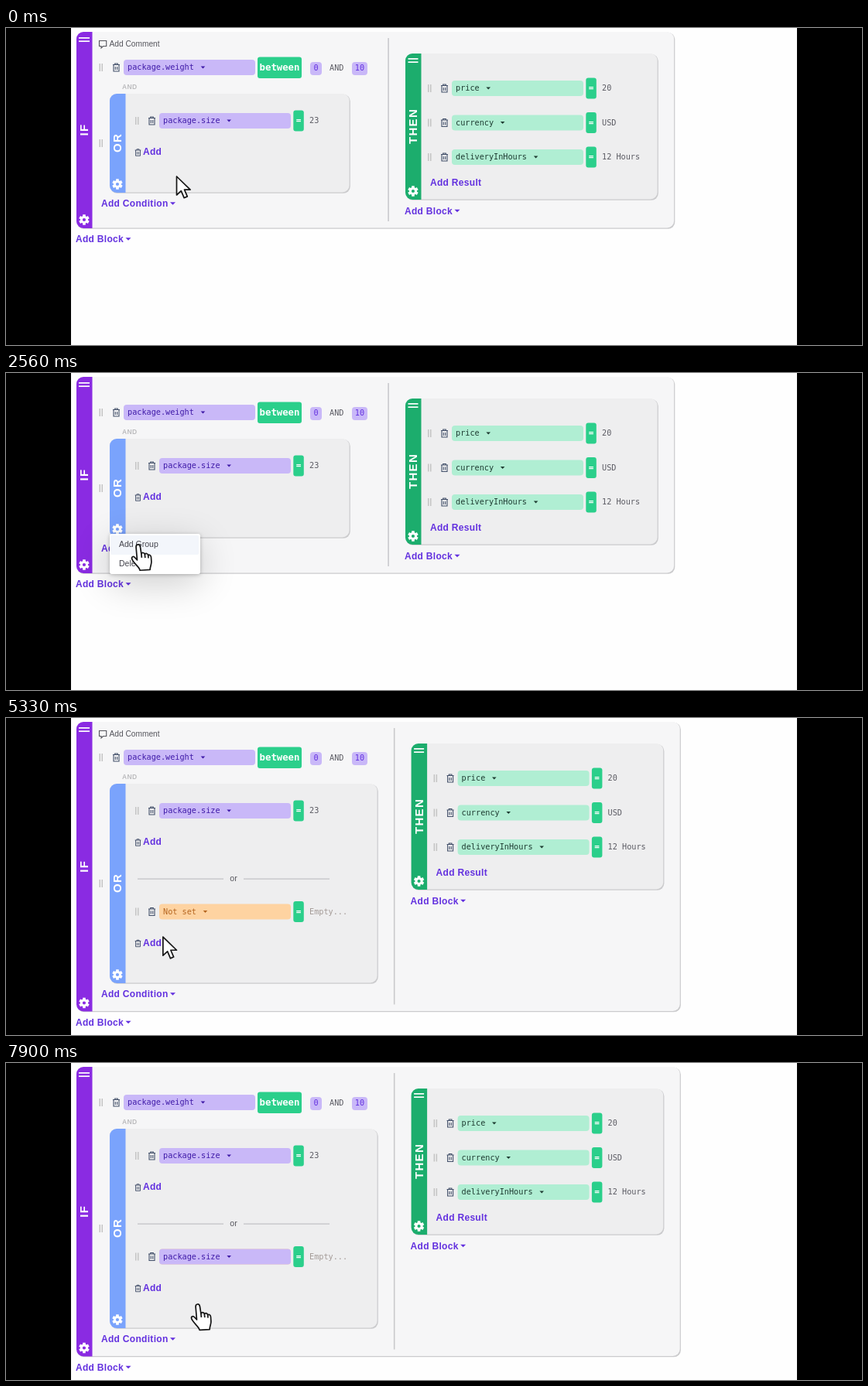
Animation, 1106 px wide and 410 px high, one loop 8000 ms. Source, as an HTML page with a canvas:

```html
<!DOCTYPE html>
<html lang="en">
<head>
<meta charset="utf-8">
<title>Rule builder</title>
<style>
  html, body { margin: 0; width: 100%; height: 100%; overflow: hidden; background: #000; }
  canvas { display: block; }
</style>
</head>
<body>
<canvas id="stage" width="1106" height="410"></canvas>
<script>
const LOOP = 8000;
const ctx = document.getElementById('stage').getContext('2d');
const SANS = '"Liberation Sans", Arial, sans-serif';
const MONO = '"DejaVu Sans Mono", monospace';
const C = {
  violet: '#8a2be2', blue: '#7aa3fc', green: '#1cad6d', op: '#2bcf8b',
  lilac: '#c9b8f8', lilacHover: '#aa87fd', mint: '#b0eed3', peach: '#fed3a1',
  link: '#6331df', linkHover: '#45229c', ink: '#3f1aa8', icon: '#43506a', grip: '#c4c4c4', value: '#5b5b63'
};

const ramp = (t, start, length) => Math.min(1, Math.max(0, (t - start) / length));
const ease = p => p * p * (3 - 2 * p);

function box(x, y, w, h, r, fill) {
  ctx.fillStyle = fill;
  ctx.beginPath();
  ctx.roundRect(x, y, w, h, r);
  ctx.fill();
}

function text(str, x, y, color, font, spacing = 0, align = 'left') {
  ctx.font = font;
  ctx.fillStyle = color;
  ctx.textAlign = align;
  ctx.letterSpacing = spacing + 'px';
  ctx.fillText(str, x, y);
}

const mono = (str, x, y, color, size = 10.2) => text(str, x, y, color, `${size}px ${MONO}`);

function faded(alpha, draw) {
  if (alpha <= 0) return;
  ctx.save();
  ctx.globalAlpha *= alpha;
  draw();
  ctx.restore();
}

function caret(x, y, color, r = 3) {
  ctx.fillStyle = color;
  ctx.beginPath();
  ctx.moveTo(x - r, y - r / 2);
  ctx.lineTo(x + r, y - r / 2);
  ctx.lineTo(x, y + r / 2);
  ctx.fill();
}

function link(str, x, y, caretX, color = C.link) {
  text(str, x, y, color, `bold 12px ${SANS}`, 0.3);
  if (caretX) caret(caretX, y - 1, color, 3.5);
}

function grip(x, y) {
  box(x - 2, y - 5, 1.5, 10, 0, C.grip);
  box(x + 1, y - 5, 1.5, 10, 0, C.grip);
}

function trash(x, y, s = 1) {
  ctx.save();
  ctx.translate(x, y);
  ctx.scale(s, s);
  ctx.strokeStyle = C.icon;
  ctx.lineWidth = 1.1;
  ctx.stroke(new Path2D('M-4.5 -3.5H4.5M-1.8 -3.5V-5H1.8V-3.5M-3.5 -3.5V5H3.5V-3.5M-1.2 -1V3M1.2 -1V3'));
  ctx.restore();
}

function gear(x, y) {
  ctx.save();
  ctx.translate(x, y);
  ctx.fillStyle = '#fff';
  ctx.beginPath();
  for (let i = 0; i < 6; i++) {
    ctx.rect(-1.8, -6.7, 3.6, 4);
    ctx.rotate(Math.PI / 3);
  }
  ctx.fill();
  ctx.lineWidth = 3;
  ctx.strokeStyle = '#fff';
  ctx.beginPath();
  ctx.arc(0, 0, 3.6, 0, 7);
  ctx.stroke();
  ctx.restore();
}

function panel(x, y, right, bottom, fill, bar, barWidth, label) {
  const w = right - x, h = bottom - y;
  box(x + 0.8, y + 0.8, w, h, 9, '#cbcbcd');
  box(x, y, w - 0.4, h - 0.6, 9, fill);
  box(x, y, barWidth, h, [9, 0, 0, 9], bar);
  const mid = x + barWidth / 2;
  ctx.save();
  ctx.translate(mid + 0.8, (y + bottom) / 2);
  ctx.rotate(-Math.PI / 2);
  text(label, 0.5, 0, '#fff', `bold 15px ${SANS}`, 1.3, 'center');
  ctx.restore();
  gear(mid - 0.3, bottom - 11);
}

function burger(x, y, w) {
  box(x, y, w, 1.7, 0, '#fff');
  box(x, y + 4.3, w, 1.7, 0, '#fff');
}

function pill(x, y, label, fill, ink) {
  box(x, y - 10, 170, 20, 4, fill);
  mono(label, x + 5, y + 0.5, ink);
  caret(x + 5 + label.length * 6.14 + 11.5, y, ink, 2.8);
}

function equals(x, y) {
  box(x, y - 13.5, 13.5, 27, 3, C.op);
  text('=', x + 6.75, y + 0.5, '#fff', `bold 11px ${MONO}`, 0, 'center');
}

function row(x, y, value, drawPill, valueColor = C.value) {
  grip(x - 29, y);
  trash(x - 9.5, y);
  drawPill();
  equals(x + 173.3, y);
  mono(value, x + 194, y + 0.5, valueColor);
}

function addGroup(y, color) {
  trash(170.5, y, 0.85);
  link('Add', 177, y, 0, color);
}

function dropShadowBox(x, y, w, h) {
  ctx.save();
  ctx.shadowColor = 'rgba(0,0,0,.2)';
  ctx.shadowBlur = 48;
  ctx.shadowOffsetY = 12;
  box(x, y, w, h, 3, '#fff');
  ctx.shadowColor = 'rgba(0,0,0,.25)';
  ctx.shadowBlur = 5;
  ctx.shadowOffsetY = 1;
  box(x, y, w, h, 3, '#fff');
  ctx.restore();
}

function commentLink() {
  ctx.strokeStyle = '#55555c';
  ctx.lineWidth = 1.1;
  ctx.stroke(new Path2D('M120.5 16.5H129.7V23.5H125.5L123 26V23.5H120.5Z'));
  text('Add Comment', 133.5, 21.5, '#55555c', `10.2px ${SANS}`);
}

function thenBlock(dx) {
  ctx.save();
  ctx.translate(dx, 0);
  panel(516, 33, 842, 222, '#eeeeef', C.green, 20.5, 'THEN');
  burger(519.5, 39, 13);
  [['price', '20'], ['currency', 'USD'], ['deliveryInHours', '12 Hours']].forEach(([name, value], i) => {
    const y = 78 + i * 44.5;
    row(576, y, value, () => pill(576, y, name, C.mint, '#1d3b31'));
  });
  link('Add Result', 548, 201);
  link('Add Block', 515, 237.5, 583);
  ctx.restore();
}

function secondGroup(t) {
  text('or', 294, 208.5, '#55555c', `10.5px ${SANS}`, 0, 'center');
  box(170, 207.6, 111, 1.2, 0, '#c2c2c6');
  box(307, 207.6, 111, 1.2, 0, '#c2c2c6');
  faded(ramp(t, 4700, 320), () => row(198, 250.5, 'Empty...', () => {
    const hover = ramp(t, 5540, 190) - ramp(t, 6560, 200);
    const chosen = ramp(t, 7665, 235);
    pill(198, 250.5, t < 7690 ? 'Not set' : '', C.peach, t < 7690 ? '#b5651f' : 'transparent');
    faded(hover, () => pill(198, 250.5, 'Not set', C.lilacHover, '#6230cf'));
    faded(chosen, () => box(198, 240.5, 170, 20, 4, C.lilac));
    if (t >= 7690) pill(198, 250.5, 'package.size', 'transparent', C.ink);
  }, '#a39a96'));
  addGroup(291.5, t > 4345 && t < 5300 ? C.linkHover : C.link);
}

function gearMenu(t) {
  dropShadowBox(134, 208, 117, 52);
  if (t > 2440) box(135, 210, 114, 25, 2, t < 2900 ? '#f3f6fb' : '#e2e8f4');
  text('Add Group', 146, 222.5, '#44444c', `10.5px ${SANS}`);
  text('Delete', 146, 247.5, '#44444c', `10.5px ${SANS}`);
}

function fieldMenu(t) {
  dropShadowBox(197.5, 262, 159.5, 86);
  mono('Search......', 206, 278.5, '#9a9a9f', 9.9);
  if (t > 6850) box(197.5, 294, 159.5, 27, 0, t < 7600 ? '#f3f6fb' : '#e2e8f4');
  box(197.5, 293.5, 159.5, 1.2, 0, '#cfcfd3');
  ['package.size', 'package.weight'].forEach((name, i) => {
    const y = 308 + i * 27;
    box(209, y - 7, name.length * 4.6 + 8, 14.5, 3, C.lilac);
    mono(name, 213, y + 0.5, C.ink, 7.65);
  });
}

const ARROW = new Path2D('M0 0.5V24.5L5.8 19.2L9.6 28.2L13.8 26.4L10 17.6H17.6Z');
const HAND = new Path2D('M0 21L-1.4 4.5C-1.8 .2 3.2 -.4 4 4L5.4 13.2C6 11 9.3 11 9.9 13.8C10.8 12 13.6 12.2 14.2 15C15.2 13.8 17.6 14.4 18 17.2L18.4 23C18.6 27 17 28 16.6 33.6L3.6 34.4C2.8 30 -3.2 26.6 -6 21.2C-8.6 17 -5 15.2 -2.8 18Z');
const KNUCKLES = new Path2D('M5.4 13.2L5.9 18M9.9 13.8L10.3 18.2M14.2 15L14.5 18.6');
const MOVES = [
  [300, 600, 143, 207], [2300, 360, 175.5, 224], [3930, 530, 191, 293],
  [5180, 440, 234.5, 255], [6460, 600, 246.5, 311]
];

function cursor(t) {
  let x = 220.5, y = 191.5;
  for (const [start, length, toX, toY] of MOVES) {
    const p = ease(ramp(t, start, length));
    x += (toX - x) * p;
    y += (toY - y) * p;
  }
  const hand = (t >= 780 && t < 3700) || (t >= 4345 && t < 5300) || t >= 5530;
  ctx.save();
  ctx.translate(x, y);
  ctx.fillStyle = '#fff';
  ctx.strokeStyle = '#161616';
  ctx.lineWidth = 1.7;
  ctx.lineJoin = 'round';
  ctx.fill(hand ? HAND : ARROW);
  ctx.stroke(hand ? HAND : ARROW);
  if (hand) ctx.stroke(KNUCKLES);
  ctx.restore();
}

function draw(t) {
  const grown = t >= 3060;
  const wide = t >= 4730;
  const bottom = grown ? 379.5 : 259;
  const orBottom = grown ? 343 : 213;
  const dx = wide ? 7.6 : 0;

  ctx.textBaseline = 'middle';
  box(0, 0, 1106, 410, 0, '#000');
  box(84, 0, 938, 410, 0, '#fefefe');

  panel(91, 5, 863.5 + dx, bottom, '#f6f6f7', C.violet, 20.5, 'IF');
  burger(94, 12, 14);
  box(493.3 + dx, 13, 1.6, bottom - 22, 0, '#c9c9cc');
  faded(1 - ramp(t, 2350, 200) + ramp(t, 3060, 250) - ramp(t, 6580, 200), commentLink);

  grip(122.5, 51);
  trash(142.5, 51);
  pill(152, 51, 'package.weight', C.lilac, C.ink);
  box(325, 37.5, 57, 27.5, 3, C.op);
  text('between', 353.5, 51.5, '#fff', `bold 12.3px ${MONO}`, 0, 'center');
  box(393, 44, 15, 17, 4, C.lilac);
  mono('0', 397.4, 52.5, C.link);
  mono('AND', 418, 52.5, C.value);
  box(447, 44, 20, 17, 4, C.lilac);
  mono('10', 450.8, 52.5, C.link);
  text('AND', 150, 77, '#bcbcbe', `bold 8.5px ${SANS}`, 0.3);

  grip(122.5, (85 + orBottom) / 2);
  panel(134, 85, wide ? 480 : 444, orBottom, '#eeeeef', C.blue, 20.5, 'OR');
  row(198, 120, '23', () => pill(198, 120, 'package.size', C.lilac, C.ink));
  addGroup(161);
  if (grown) faded(ramp(t, 3030, 330), () => secondGroup(t));
  link('Add Condition', 123, orBottom + 15, 215.5);
  link('Add Block', 90, bottom + 15, 158);

  thenBlock(dx);
  if (t >= 1760 && t < 3060) gearMenu(t);
  if (t >= 6230 && t < 7690) fieldMenu(t);
  cursor(t);
}

const begin = performance.now();
function tick() {
  draw((performance.now() - begin) % LOOP);
  requestAnimationFrame(tick);
}
tick();
</script>
</body>
</html>
```
